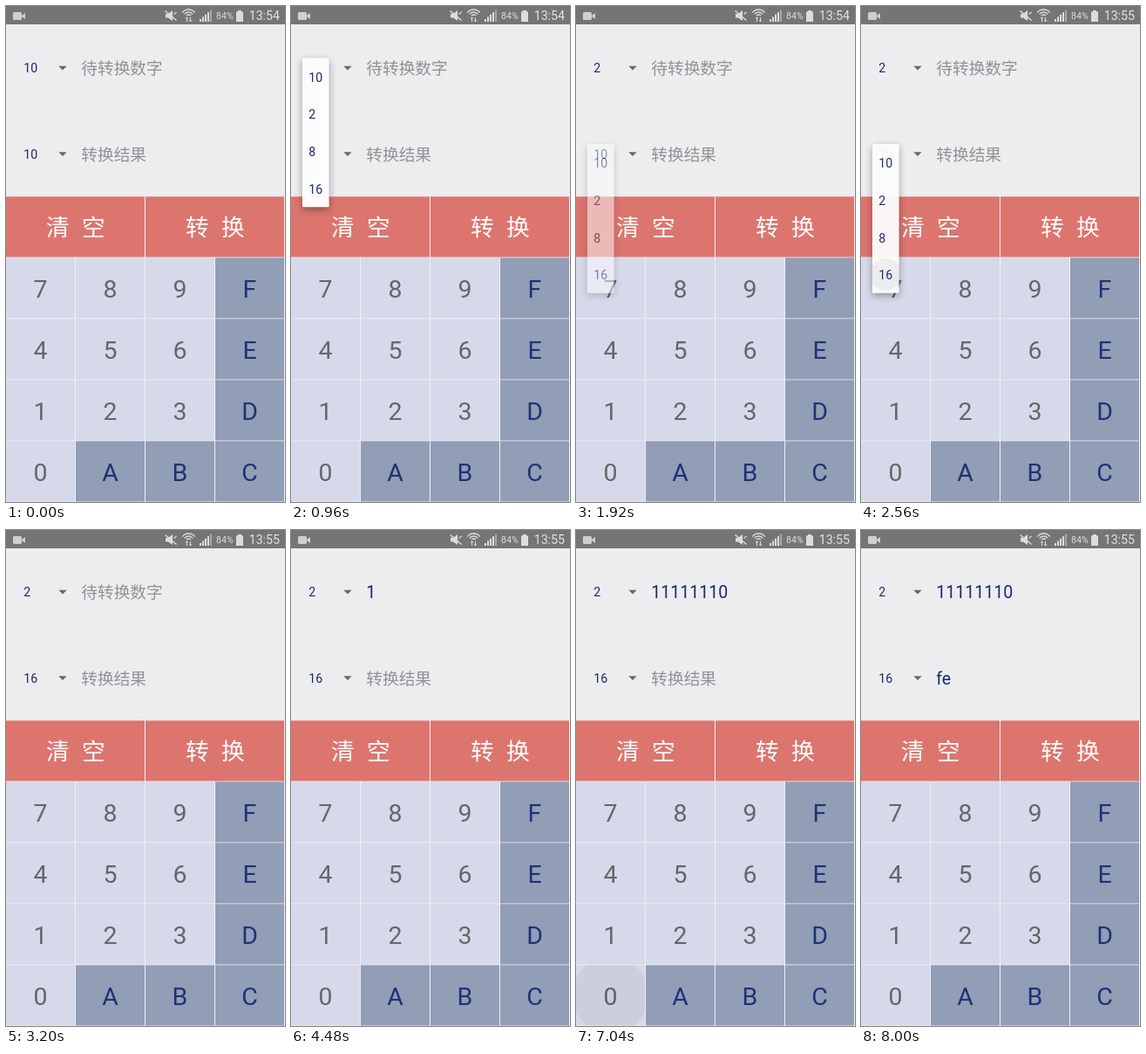
Write an HTML page that moves like this. It is 320 px wide and 568 px high and loops after 8160 ms.

```html
<!DOCTYPE html>
<html lang="zh-CN">
<head>
<meta charset="utf-8">
<title>Base converter</title>
<style>
  html, body { margin: 0; width: 100%; height: 100%; overflow: hidden; background: #ededef; }
  svg { display: block; }
  text { font-family: Roboto, "Noto Sans CJK SC", "Noto Sans CJK", sans-serif; white-space: pre; }
  .popup rect { filter: drop-shadow(0 3px 4px rgba(0, 0, 0, .35)); }
</style>
</head>
<body>
<svg id="stage" width="320" height="568" viewBox="0 0 320 568"></svg>
<script>
const LOOP = 8160, STEP = 160;
const NAVY = '#1b2b68', HINT = '#929296', ICON = '#dcdcdc';
const stage = document.getElementById('stage');

function add(tag, attrs, parent = stage) {
  const el = document.createElementNS('http://www.w3.org/2000/svg', tag);
  for (const k in attrs) el.setAttribute(k, attrs[k]);
  parent.appendChild(el);
  return el;
}
const rect = (x, y, width, height, fill, parent) => add('rect', { x, y, width, height, fill }, parent);
const path = (d, attrs) => add('path', { d, fill: 'none', stroke: ICON, ...attrs });
function label(x, y, size, fill, str, anchor = 'start', parent = stage) {
  const el = add('text', { x, y, 'font-size': size, fill, 'text-anchor': anchor }, parent);
  el.textContent = str;
  return el;
}

rect(0, 0, 320, 568, '#ededef');

// Status bar
rect(0, 0, 320, 21, '#757575');
add('rect', { x: 8, y: 7, width: 10, height: 9, rx: 1.5, fill: '#cfcfcf' });
path('M18 11L22 8V15L18 12Z', { fill: '#cfcfcf', stroke: 'none' });
path('M183 9H186L191 5V17L186 13.5H183Z', { fill: ICON, stroke: 'none' });
path('M182.5 5.5L195.5 16.5', { 'stroke-width': 1.6 });
path('M192.5 9.5L195.5 7', { 'stroke-width': 1.2 });
for (const r of [3, 6, 9]) {
  const d = r * .8;
  path(`M${209.5 - d} ${13 - r * .6}A${r} ${r} 0 0 1 ${209.5 + d} ${13 - r * .6}`, { 'stroke-width': 1.4 });
}
path('M207.5 13V18M206 14.5L207.5 12.8L209 14.5M211.5 13V18M210 16.3L211.5 18L213 16.3', { 'stroke-width': 1 });
for (let i = 0; i < 5; i++) rect(222 + i * 3, 15 - i * 2.6, 2, 3 + i * 2.6, i < 4 ? ICON : '#a8a8a8');
label(241, 15.3, 10.6, ICON, '84%');
rect(266, 5, 4, 2, ICON);
rect(264, 6.5, 8, 11.5, ICON);
const clock = label(314, 16, 14.2, '#e2e2e2', '', 'end');

// Input and result rows
const rows = [71, 169.5].map(y => {
  path(`M60.3 ${y - 2.3}H69.7L65 ${y + 2.4}Z`, { fill: '#686868', stroke: 'none' });
  return { y, base: label(20.3, y + 5, 14.2, NAVY, ''), value: label(86.3, y + 7, 19.56, NAVY, '') };
});

// Keypad
const cell = (col, row, span, fill) => rect(col * 80, 218.3 + row * 70, span * 80 - 1, 69.2, fill);
rect(0, 218, 320, 350, '#f0f0f5');
['清空', '转换'].forEach((word, i) => {
  cell(i * 2, 0, 2, '#dc756e');
  [...word].forEach((ch, j) => label(59.3 + i * 160 + j * 41, 263, 26.7, '#fff', ch, 'middle'));
});
['789F', '456E', '123D', '0ABC'].forEach((line, r) => [...line].forEach((ch, c) => {
  const hex = ch >= 'A';
  cell(c, r + 1, 1, hex ? '#929db6' : '#d6d9e9');
  label(c * 80 + 39.5, 334 + r * 70, 28.5, hex ? '#1f3276' : '#66666a', ch, 'middle');
}));

// Drop-down lists
const popups = [59.5, 158].map(y => {
  const g = add('g', { class: 'popup' });
  add('rect', { x: 13, y, width: 30.6, height: 170.7, rx: 1.2, fill: '#fcfcfd' }, g);
  ['10', '2', '8', '16'].forEach((n, i) => label(20.3, y + 27.3 + i * 42.67, 14.2, NAVY, n, 'start', g));
  return g;
});

const box = add('svg', {});
const ripple = add('circle', { fill: '#000', 'fill-opacity': .05 }, box);

// [time, value], each held until the next
const fades = [
  [[0, 0], [640, .5], [800, 1], [1440, .4], [1600, 0]],
  [[0, 0], [1920, .5], [2080, 1], [2560, .95], [2720, .4], [2880, 0]]
];
const bases = [[[0, '10'], [1440, '2']], [[0, '10'], [2720, '16']]];
const clockSteps = [[0, '13:54'], [2240, '13:55']];
const typing = [4160, 4800, 5280, 5600, 6080, 6400, 6720, 7040];
const DIGITS = '11111110', RESULT = 7999;

// [start, end, x, y, width, height, radius]
const key = (start, end, row) => [start, end, 0, 218.3 + row * 70, 79, 69.2, 44];
const presses = [
  [1120, 1440, 13, 103.5, 30.6, 43, 18.5],
  [2400, 2720, 13, 287, 30.6, 41, 18.5],
  key(4000, 4480, 3), key(4640, 5120, 3), key(5120, 5440, 3), key(5440, 5760, 3),
  key(5920, 6240, 3), key(6240, 6560, 3), key(6560, 6880, 3), key(6880, 7200, 4),
  [7680, 8000, 160, 218.3, 159, 69.2, 84]
];

const held = (steps, t) => steps.reduce((v, [at, next]) => t >= at ? next : v, steps[0][1]);

function setValue(row, str, hint) {
  row.value.textContent = str || hint;
  row.value.setAttribute('fill', str ? NAVY : HINT);
  row.value.setAttribute('font-size', str ? 19.56 : 18.7);
}

function draw(t) {
  clock.textContent = held(clockSteps, t);
  rows.forEach((row, i) => row.base.textContent = held(bases[i], t));
  popups.forEach((g, i) => g.setAttribute('opacity', held(fades[i], t)));
  setValue(rows[0], DIGITS.slice(0, typing.filter(at => t >= at).length), '待转换数字');
  setValue(rows[1], t > RESULT ? 'fe' : '', '转换结果');

  const press = presses.find(([start, end]) => t >= start && t < end);
  box.style.display = press ? '' : 'none';
  if (press) {
    const [start, , x, y, width, height, r] = press;
    Object.entries({ x, y, width, height }).forEach(([k, v]) => box.setAttribute(k, v));
    ripple.setAttribute('cx', width / 2);
    ripple.setAttribute('cy', height / 2);
    ripple.setAttribute('r', t - start < STEP ? r * .65 : r);
  }
}

let last = -1;
const origin = performance.now();
function tick(now) {
  const t = Math.floor(Math.max(0, now - origin) % LOOP / STEP) * STEP;
  if (t !== last) draw(last = t);
  requestAnimationFrame(tick);
}
draw(0);
requestAnimationFrame(tick);
</script>
</body>
</html>
```
